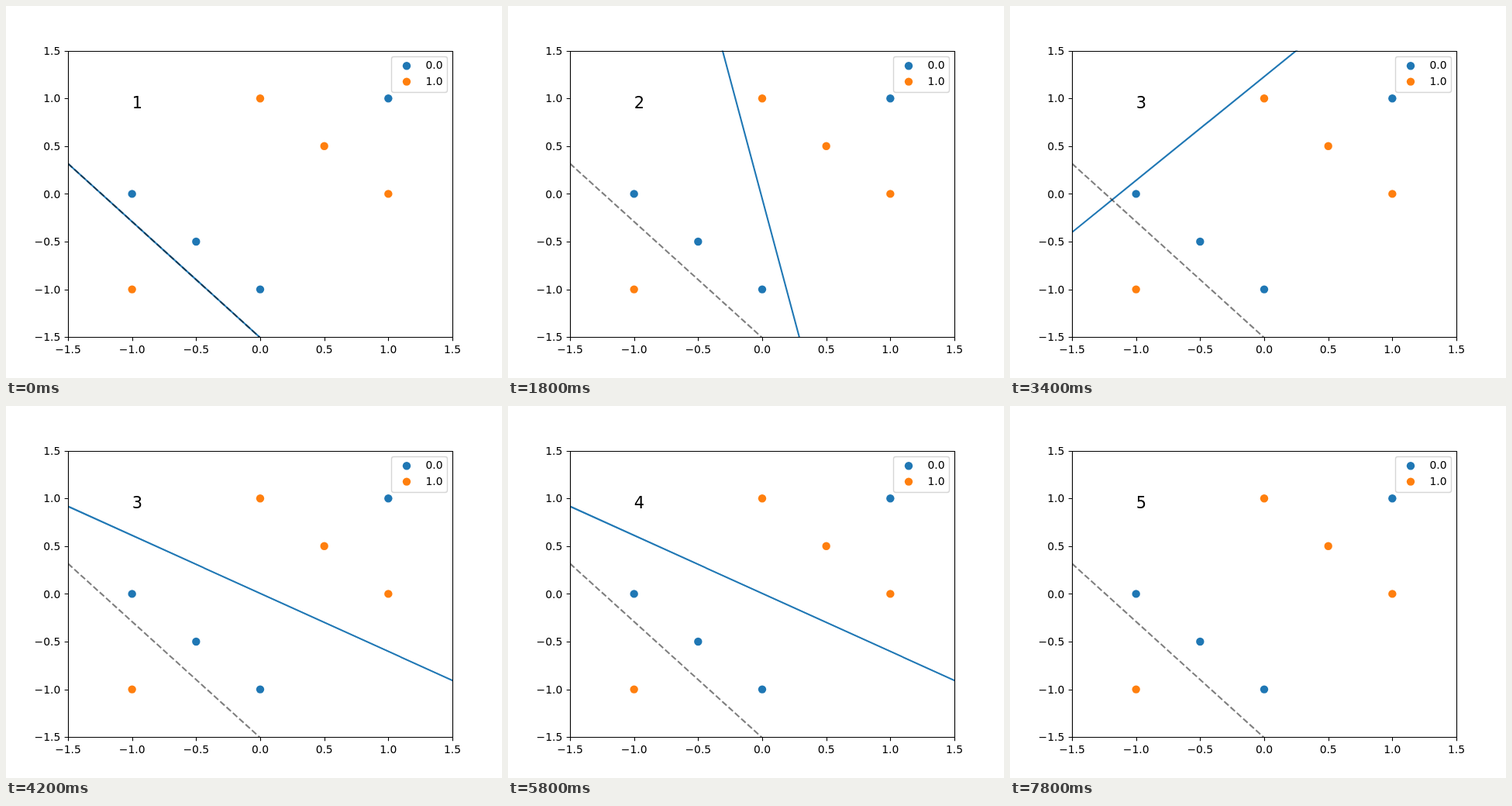
An HTML page for the animation above (8000 ms loop, 640x480 px).

```html
<!DOCTYPE html>
<html>
<head>
<meta charset="utf-8">
<style>
html, body { margin: 0; width: 100%; height: 100%; overflow: hidden; background: #fff; }
svg { display: block; font: 13.89px "DejaVu Sans", sans-serif; }
</style>
</head>
<body>
<svg id="plot" width="640" height="480" viewBox="0 0 640 480"></svg>
<script>
const svg = document.getElementById('plot');
const colors = ['#1f77b4', '#ff7f0e'];
// Training samples in presentation order: x, y, class
const samples = [
  [-1, 0, 0], [0, -1, 0], [-.5, -.5, 0], [1, 1, 0],
  [-1, -1, 1], [1, 0, 1], [0, 1, 1], [.5, .5, 1]
];
const STEP = 200, STEPS = 40;

const px = x => 80 + (x + 1.5) * 496 / 3;
const py = y => 57.6 + (1.5 - y) * 369.6 / 3;
const snap = v => Math.floor(v + .5) + .5;

function add(tag, attrs, text = '') {
  const el = document.createElementNS('http://www.w3.org/2000/svg', tag);
  for (const k in attrs) el.setAttribute(k, attrs[k]);
  el.textContent = text;
  return svg.appendChild(el);
}
const dot = (cx, cy, cls) => add('circle', { cx, cy, r: 5.2, fill: colors[cls] });
const label = (x, y, text, anchor = 'start') => add('text', { x, y, 'text-anchor': anchor }, text);

// Path of the line w1*x + w2*y + b = 0
function boundary([w1, w2, b], reach) {
  const y = x => py(-(w1 * x + b) / w2);
  return `M${px(-reach)} ${y(-reach)}L${px(reach)} ${y(reach)}`;
}

// Perceptron weights before each step, learning rate 1
const states = [[-1.6068, -1.3217, -1.991]];
for (let i = 0; i < STEPS - 1; i++) {
  const [w1, w2, b] = states[i], [x, y, cls] = samples[i % 8];
  const err = cls - (w1 * x + w2 * y + b > 0 ? 1 : 0);
  states.push([w1 + err * x, w2 + err * y, b + err]);
}

add('clipPath', { id: 'area' }).innerHTML = '<rect x="80" y="57.6" width="496" height="369.6"/>';
for (const [x, y, cls] of samples) dot(px(x), py(y), cls);

const clipped = { fill: 'none', 'stroke-width': 2.083, 'clip-path': 'url(#area)' };
const line = add('path', { ...clipped, stroke: colors[0] });
add('path', {
  ...clipped, stroke: '#000', 'stroke-opacity': .5,
  'stroke-dasharray': '7.71 3.33', d: boundary(states[0], 1.5)
});

// Axes
let ticks = '';
for (let v = -1.5; v <= 1.5; v += .5) {
  const text = v.toFixed(1).replace('-', '\u2212');
  ticks += `M${snap(px(v))} 427.5v4.86M80.5 ${snap(py(v))}h-4.86`;
  label(px(v), 448, text, 'middle');
  label(70.3, Math.round(py(v) + 5.28), text, 'end');
}
add('path', { d: 'M80.5 58.5H576.5V427.5H80.5Z' + ticks, fill: 'none', stroke: '#000', 'stroke-width': 1.11 });

// Legend
add('rect', {
  x: 497.5, y: 65.5, width: 72, height: 46, rx: 2.78, fill: '#fff', 'fill-opacity': .8,
  stroke: '#ccc', 'stroke-opacity': .8, 'stroke-width': 1.39
});
['0.0', '1.0'].forEach((name, i) => {
  dot(517, 77.2 + 20.4 * i, i);
  label(541.5, 81 + 21 * i, name);
});

const epoch = add('text', { x: 162.7, y: 132, 'font-size': 20.83 });

function draw() {
  const i = Math.floor(performance.now() / STEP) % STEPS;
  line.setAttribute('d', boundary(states[i], 3));
  epoch.textContent = Math.floor(i / 8) + 1;
  requestAnimationFrame(draw);
}
draw();
</script>
</body>
</html>
```
